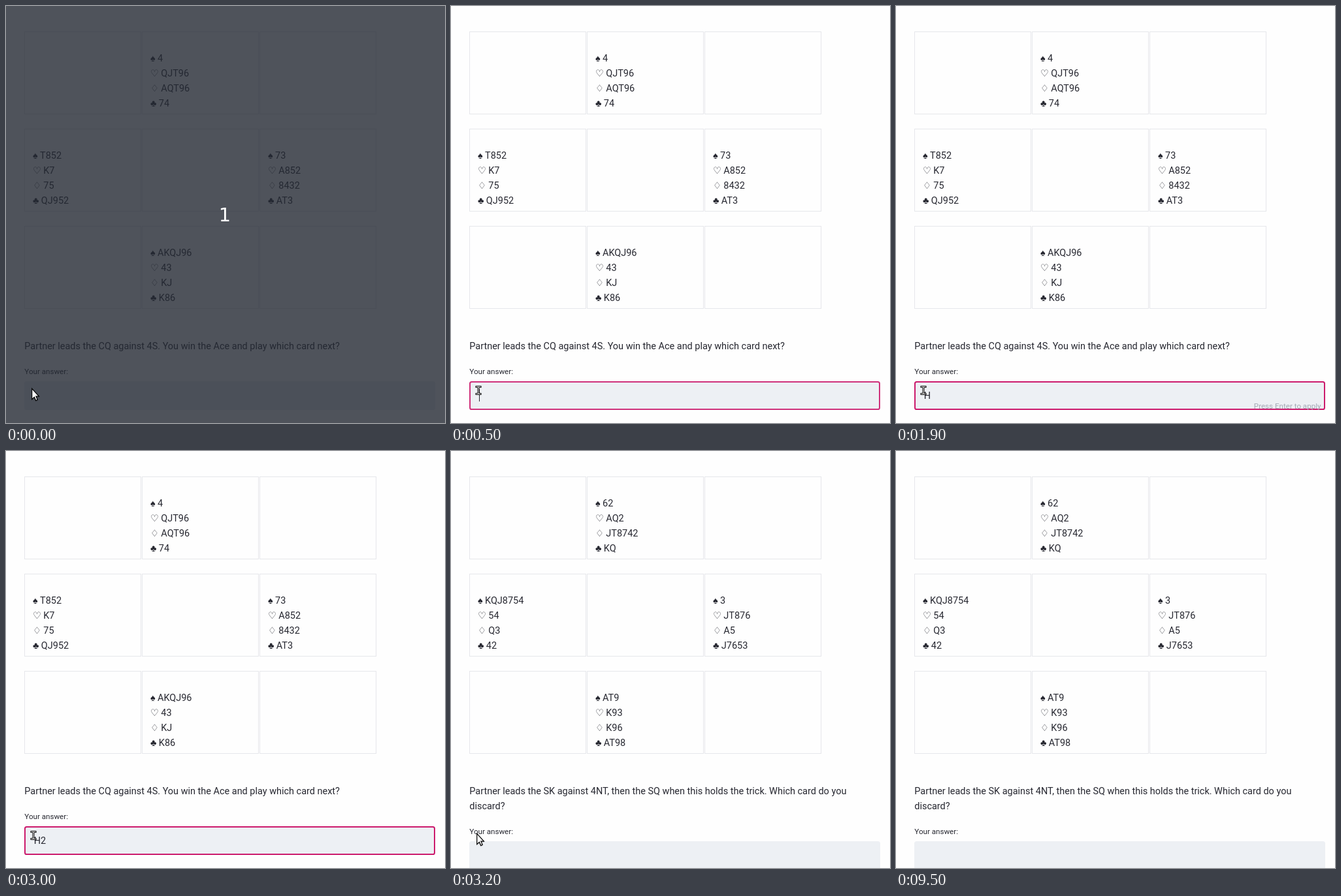
An HTML page with a canvas for the animation above (10000 ms loop, 672 by 639 pixels).

```html
<!DOCTYPE html>
<html lang="en">
<head>
<meta charset="utf-8">
<title>Bridge defence quiz</title>
<style>
  html, body { margin: 0; width: 100%; height: 100%; overflow: hidden; background: #fefefe; }
  canvas { display: block; }
</style>
</head>
<body>
<canvas id="stage" width="672" height="639"></canvas>
<script>
const ctx = document.getElementById('stage').getContext('2d');
const LOOP = 10000;
const INK = '#262730';
const BODY = '14.46px Roboto, sans-serif';
const SMALL = '11.6px Roboto, sans-serif';
const SUITS = '14.4px "Liberation Sans", "DejaVu Sans", sans-serif';

const deals = [
  {
    north: '4 QJT96 AQT96 74', west: 'T852 K7 75 QJ952',
    east: '73 A852 8432 AT3', south: 'AKQJ96 43 KJ K86',
    question: ['Partner leads the CQ against 4S. You win the Ace and play which card next?']
  },
  {
    north: '62 AQ2 JT8742 KQ', west: 'KQJ8754 54 Q3 42',
    east: '3 JT876 A5 J7653', south: 'AT9 K93 K96 AT98',
    question: ['Partner leads the SK against 4NT, then the SQ when this holds the trick. Which card do you', 'discard?']
  }
];

function text(str, x, y, font = BODY, color = INK, align = 'left') {
  ctx.font = font;
  ctx.fillStyle = color;
  ctx.textAlign = align;
  ctx.fillText(str, x, y);
}

function drawHand(cards, col, row) {
  const x = 41 + 180 * col;
  cards.split(' ').forEach((ranks, i) => {
    const y = 85 + 149 * row + 23 * i;
    const suit = '♠♡♢♣'[i];
    text(suit, x, y, SUITS);
    text(ranks, x + ctx.measureText(suit).width + 3.4, y);
  });
}

function drawDeal(deal) {
  ctx.strokeStyle = '#e6e7eb';
  ctx.lineWidth = 1;
  for (let i = 0; i < 9; i++) {
    ctx.strokeRect(28.5 + 180 * (i % 3), 39.5 + 149 * Math.floor(i / 3), 178, 126);
  }
  drawHand(deal.north, 1, 0);
  drawHand(deal.west, 0, 1);
  drawHand(deal.east, 2, 1);
  drawHand(deal.south, 1, 2);
  deal.question.forEach((line, i) => text(line, 28.3, 526 + 23 * i));
}

function drawInput(shift, focus) {
  text('Your answer:', 28.3, 564 + shift, SMALL);
  ctx.fillStyle = '#edf0f4';
  ctx.beginPath();
  ctx.roundRect(28, 575 + shift, 629, 44, 3.6);
  ctx.fill();
  if (!focus) return;
  ctx.globalAlpha = focus;
  ctx.strokeStyle = '#cc1a6c';
  ctx.lineWidth = 2;
  ctx.beginPath();
  ctx.roundRect(29, 576 + shift, 627, 42, 2.6);
  ctx.stroke();
  ctx.globalAlpha = 1;
}

function drawTyping(t) {
  text(t < 1300 ? '' : t < 2100 ? 'H' : 'H2', 42.8, 602);
  if (t >= 1300 && t < 3000) {
    text('Press Enter to apply', 650.5, 616.5, SMALL, '#a3a8b4', 'right');
  }
  const caret = t < 900 ? 43 : t >= 1300 && t < 1900 ? 53 : t >= 2100 && t < 2600 ? 62 : 0;
  ctx.fillStyle = INK;
  if (caret) ctx.fillRect(caret, 587, 1, 19);
}

function drawArrow(x, y) {
  ctx.save();
  ctx.translate(x, y);
  const arrow = new Path2D('M.7 1.3V17.6L4.4 14.2 6.7 19.6 9.2 18.5 6.9 13.2H11.4Z');
  ctx.shadowColor = 'rgba(0,0,0,.3)';
  ctx.shadowBlur = 2;
  ctx.shadowOffsetY = 1;
  ctx.fillStyle = '#fff';
  ctx.fill(arrow);
  ctx.shadowColor = 'transparent';
  ctx.strokeStyle = '#000';
  ctx.lineWidth = 1.2;
  ctx.stroke(arrow);
  ctx.restore();
}

function drawTextCursor() {
  const beam = new Path2D('M39 583.5H45M42 583.5V594.5M39 594.5H45');
  ctx.lineCap = 'square';
  for (const [color, width] of [['#000', 3], ['#fff', 1]]) {
    ctx.strokeStyle = color;
    ctx.lineWidth = width;
    ctx.stroke(beam);
  }
  ctx.lineCap = 'butt';
}

function drawPointer(t) {
  if (t < 300 || (t >= 3200 && t < 9200)) drawArrow(39, 585);
  else if (t < 3200) drawTextCursor();
  else if (t < 9500) {
    const k = (t - 9200) / 200;
    drawArrow(39 + 62 * k * k, 582 - 549 * k);
  }
}

function render(time) {
  const t = Math.floor(time % LOOP / 100) * 100;
  const second = t >= 3100;
  ctx.fillStyle = '#fefefe';
  ctx.fillRect(0, 0, 672, 639);
  drawDeal(deals[+second]);
  const fade = Math.min(1, Math.max(0, (t - 300) / 300));
  drawInput(second ? 23 : 0, second ? 0 : 1 - (1 - fade) ** 2);
  if (t < 300) {
    ctx.fillStyle = 'rgba(36,40,50,.8)';
    ctx.fillRect(0, 0, 672, 639);
    text('1', 335, 330, '28.8px "DejaVu Sans", sans-serif', '#fff', 'center');
  } else if (!second) {
    drawTyping(t);
  }
  drawPointer(t);
}

const start = performance.now();
function tick() {
  render(performance.now() - start);
  requestAnimationFrame(tick);
}
tick();
</script>
</body>
</html>
```
